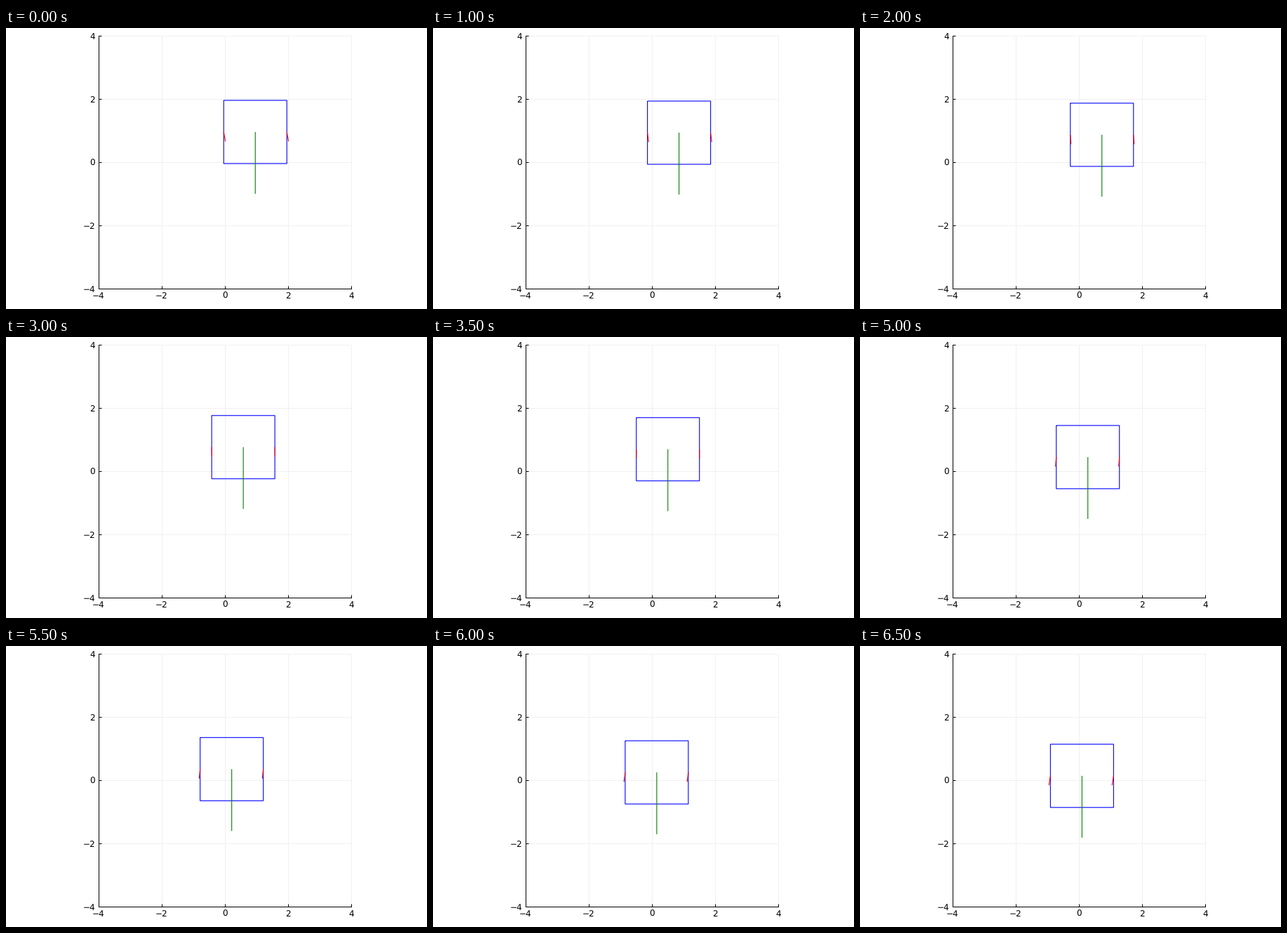
These frames come from a looping animation (600x400 px, 7000 ms). A matplotlib script:

```python
import matplotlib.pyplot as plt
from matplotlib.animation import FuncAnimation

W, H, DPI = 600, 400, 100
FRAMES, STEP = 14, 500
LEFT, RIGHT, TOP, BOTTOM = 132.5, 492.5, 11.5, 371.5
HALF = 45          # half the square's side, also one axis unit
JET = 13.4
ROD = 88
PT = 72 / DPI      # points per pixel

plt.rcParams["font.family"] = "DejaVu Sans"
plt.rcParams["text.hinting"] = "none"
fig = plt.figure(figsize=(W / DPI, H / DPI), dpi=DPI, facecolor="white")
ax = fig.add_axes([0, 0, 1, 1])
ax.set_xlim(0, W)
ax.set_ylim(H, 0)
ax.axis("off")


def line(xs, ys, color, px=1.0, z=2):
    # snapping off, so that lines move by fractions of a pixel
    return ax.plot(xs, ys, color=color, lw=px * PT, zorder=z, snap=False,
                   solid_capstyle="butt", solid_joinstyle="miter")[0]


def draw_axes():
    for v in range(-4, 5, 2):
        x = 312.5 + HALF * v
        y = 191.5 - HALF * v
        if v > -4:
            line([x, x], [TOP, BOTTOM], "#f0f0f0", z=0)
            line([LEFT, RIGHT], [y, y], "#f0f0f0", z=0)
        line([x, x], [BOTTOM, BOTTOM - 4], "black")
        line([LEFT, LEFT + 4], [y, y], "black")
        name = str(v).replace("-", "\u2212")
        ax.text(x - 0.5, 385.2, name, size=12 * PT, ha="center", va="baseline")
        ax.text(127.2, y + 4.4, name, size=12 * PT, ha="right", va="baseline")
    line([LEFT, LEFT], [TOP - 0.5, BOTTOM + 0.5], "black")
    line([LEFT - 0.5, RIGHT + 0.5], [BOTTOM, BOTTOM], "black")


draw_axes()
body = line([], [], "blue", 1.1, 3)
jets = [line([], [], "red", 1.1, 4) for _ in range(2)]
rod = line([], [], "green", 1.1, 5)


def centre(n):
    m = n - 7
    x = 334.75 - 3.43 * m + 0.0102 * m ** 3
    y = 148 - 0.03 * n + 0.2735 * n ** 2 - 0.0041 * n ** 3
    return x, y


def update(n):
    x, y = centre(n)
    l, r, t, b = x - HALF, x + HALF, y - HALF, y + HALF
    body.set_data([l, r, r, l, l], [t, t, b, b, t])
    lean = 2.4 - 0.35 * n
    for jet, side in zip(jets, (l, r)):
        jet.set_data([side, side + lean], [y, y + JET])
    rod.set_data([x, x], [y, y + ROD])
    return [body, *jets, rod]


anim = FuncAnimation(fig, update, frames=FRAMES, interval=STEP,
                     init_func=lambda: update(0), repeat=True, repeat_delay=0)
plt.show()
```
